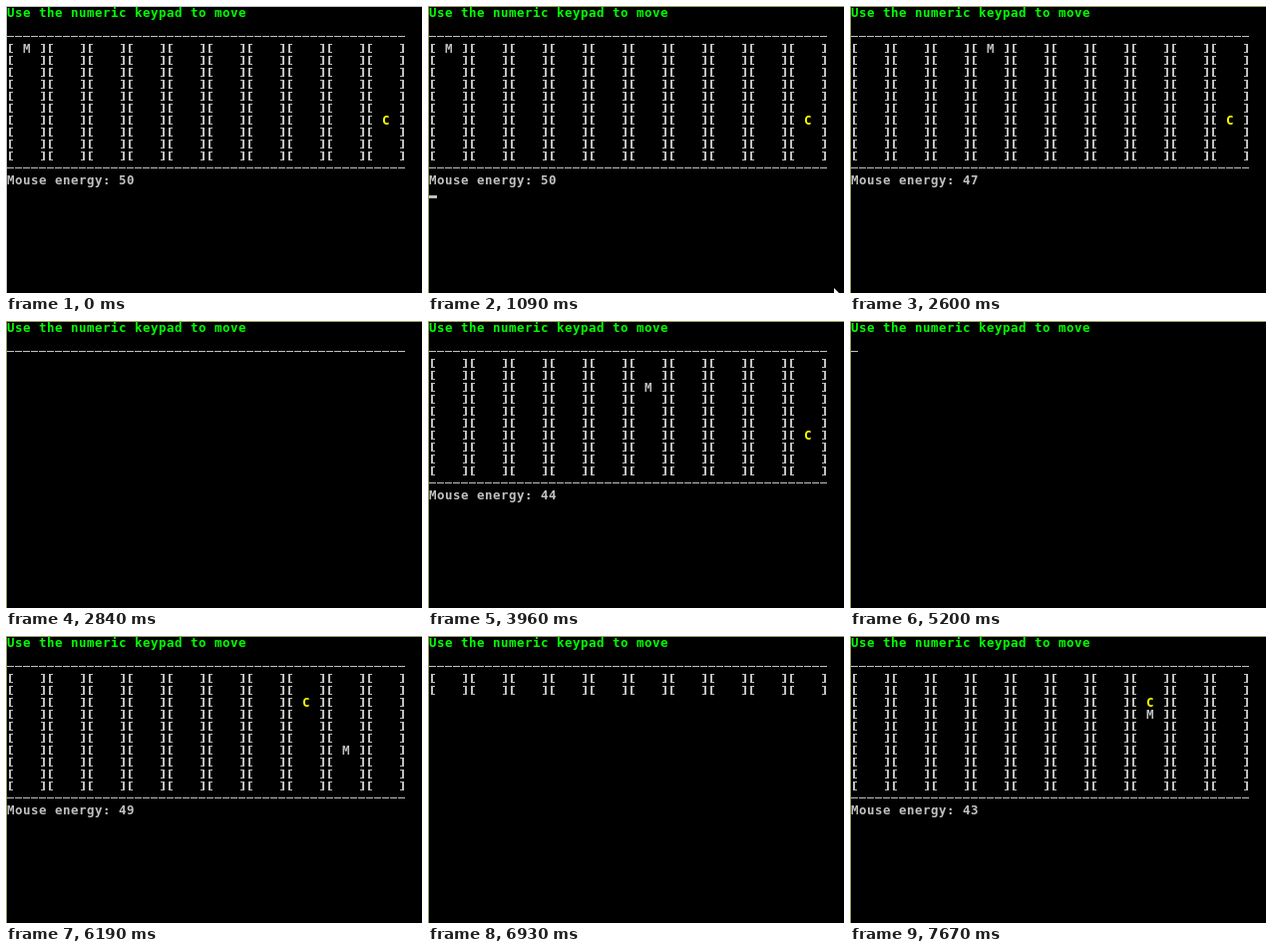
An HTML page with a canvas for the animation above (8000 ms loop, 417 by 288 pixels).

```html
<!DOCTYPE html>
<html lang="en">
<head>
<meta charset="utf-8">
<title>Mouse game</title>
<style>
  html, body { margin: 0; height: 100%; overflow: hidden; background: #000; }
  canvas { display: block; }
</style>
</head>
<body>
<canvas id="stage" width="417" height="288"></canvas>
<script>
const ctx = document.getElementById('stage').getContext('2d');
const LOOP = 8000, SIZE = 10, CHAR_W = 8, CHAR_H = 12, FULL_ENERGY = 50;
const GREY = '#c0c0c0', GREEN = '#00ff00', YELLOW = '#ffff00', OLIVE = '#9c9c5c';

// One character per tick: a digit is a keypad press, '.' is a pause,
// and the other marks are moments when the screen is only partly printed.
const KEYS = '6.66=6...2....3..3.3..3.-3......44.4.8#8.8..6';
const TICK = 123.6, FIRST_TICK = 18;
const PRINTED_ROWS = { '=': 0, '-': -1, '#': 2 };

const between = (t, from, to) => t >= from && t < to;
const cellX = col => 1 + col * CHAR_W;
const cellY = line => 1 + line * CHAR_H;

// Replays the key presses up to time t.
function gameAt(t) {
  const mouse = { col: 0, row: 0 };
  let cheese = { col: 9, row: 6 };
  let energy = FULL_ENERGY, rows = SIZE;
  const played = KEYS.slice(0, Math.max(0, Math.floor(t / TICK) - FIRST_TICK + 1));
  for (const key of played) {
    rows = PRINTED_ROWS[key] ?? SIZE;
    if (!(key > 0)) continue;
    mouse.col += (key - 1) % 3 - 1;
    mouse.row += 1 - Math.floor((key - 1) / 3);
    energy--;
    if (mouse.col === cheese.col && mouse.row === cheese.row) {
      energy = FULL_ENERGY;
      cheese = { col: 7, row: 2 };
    }
  }
  return { mouse, cheese, energy, rows };
}

function rect(x, y, w, h, color) {
  ctx.fillStyle = color;
  ctx.fillRect(x, y, w, h);
}

function print(text, col, line, color) {
  ctx.fillStyle = color;
  [...text].forEach((char, i) => ctx.fillText(char, cellX(col + i), cellY(line) + 10));
}

function dashes(line, count) {
  for (let i = 0; i < count; i++) rect(cellX(i), cellY(line) + 5, 7, 1, GREY);
}

function bracket(col, line, closing) {
  const x = cellX(col) + 2, y = cellY(line) + 1;
  rect(closing ? x + 2 : x, y, 2, 9, GREY);
  rect(x, y, 4, 1, GREY);
  rect(x, y + 8, 4, 1, GREY);
}

function piece(letter, { col, row }, color, rows) {
  if (row < rows) print(letter, col * 5 + 2, row + 3, color);
}

function pointer(x, y) {
  ctx.fillStyle = '#fff';
  ctx.beginPath();
  ctx.moveTo(x, y);
  ctx.lineTo(x, y + 11);
  ctx.lineTo(x + 8, y + 8);
  ctx.fill();
}

function draw(t) {
  const { mouse, cheese, energy, rows } = gameAt(t);
  const edge = t < 120 ? GREY : OLIVE;

  rect(0, 0, 417, 288, '#000');
  rect(0, 0, 417, 1, edge);
  rect(0, 0, 1, 288, edge);
  ctx.font = 'bold 12.5px "DejaVu Sans Mono", monospace';
  print('Use the numeric keypad to move', 0, 0, GREEN);

  dashes(2, rows < 0 ? 1 : SIZE * 5);
  for (let r = 0; r < rows; r++) {
    for (let c = 0; c < SIZE; c++) {
      bracket(c * 5, r + 3, false);
      bracket(c * 5 + 4, r + 3, true);
    }
  }
  piece('C', cheese, YELLOW, rows);
  piece('M', mouse, GREY, rows);

  if (rows === SIZE) {
    dashes(13, SIZE * 5);
    print('Mouse energy: ' + energy, 0, 14, GREY);
  }
  const cursorOn = between(t, 120, 600) || between(t, 1090, 1700) || between(t, 5820, 6180);
  if (cursorOn) rect(1, 190, 8, 3, GREY);
  if (between(t, 1090, 1210)) pointer(407, 283);
}

function tick() {
  draw(performance.now() % LOOP);
  requestAnimationFrame(tick);
}
tick();
</script>
</body>
</html>
```
